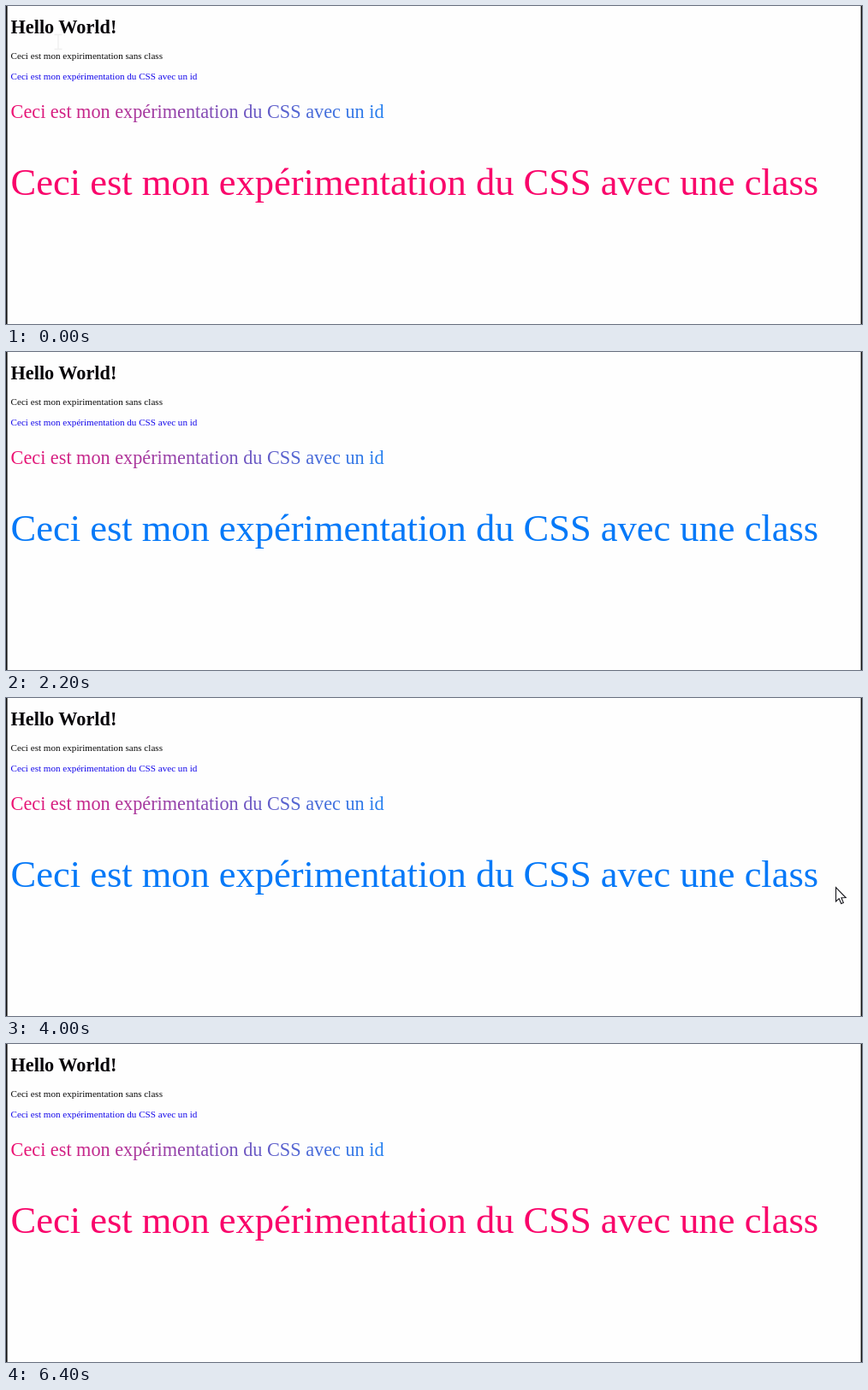
Write an HTML page with a canvas that moves like this. It is 1000 by 372 pixels and loops after 6500 ms.

```html
<!DOCTYPE html>
<html lang="fr">
<head>
<meta charset="utf-8">
<title>Hello World!</title>
<style>
  html, body { margin: 0; width: 100%; height: 100%; overflow: hidden; background: #fefefe; }
  canvas { display: block; }
</style>
</head>
<body>
<canvas id="stage" width="1000" height="372"></canvas>
<script>
const ctx = document.getElementById("stage").getContext("2d");
const LOOP = 6500, STEP = 100;
const EM = 11.12, LEFT = EM / 2, TOP = 11.9;
const LINE = 1.14, ASCENT = 0.911;
const PINK = "#f9046a", BLUE = "#0579f8";
const INTRO = "Ceci est mon expérimentation du CSS avec ";
const ARROW = new Path2D("M0 0V16.5L3.7 13.2 6.2 19 8.8 17.9 6.4 12.2 11.6 12Z");
const BEAM = new Path2D("M-4.5 -8.5h9m-4.5 0v17m-4.5 0h9");

const fade = ctx.createLinearGradient(LEFT, 0, 442, 0);
fade.addColorStop(0, "#ee1272");
fade.addColorStop(1, "#2480f0");

// Eased move between two points, k from 0 to 1
function glide(k, x0, y0, x1, y1) {
  const e = k * k * (3 - 2 * k);
  return [x0 + (x1 - x0) * e, y0 + (y1 - y0) * e];
}

function pointerAt(t) {
  if (t < 1400) return glide(t / 1400, 61, 42, 377.5, 240);
  if (t < 3300) return glide((t - 1400) / 1900, 377.5, 240, 514.5, 237);
  if (t < 4000) return glide((t - 3300) / 700, 514.5, 237, 969.5, 221.5);
  return glide((t - 4000) / 1000, 969.5, 221.5, 727.5, 170);
}

// Page flow: each block sits below the last, with collapsed margins
function drawPage(hover) {
  const blocks = [
    { text: "Hello World!", em: 2, margin: 1.34, color: "#060408", weight: "bold" },
    { text: "Ceci est mon expirimentation sans class", em: 1, color: "#080808" },
    { text: INTRO + "un id", em: 1, color: "#1206ea" },
    { text: INTRO + "un id", em: 2, color: fade },
    { text: INTRO + "une class", em: 4, color: hover ? BLUE : PINK }
  ];
  let y = TOP, gap = 0;
  for (const { text, em, margin = em, color, weight = "normal" } of blocks) {
    if (y > TOP) y += Math.max(gap, margin) * EM;
    ctx.font = `${weight} ${em * EM}px "Liberation Serif", "Times New Roman", serif`;
    ctx.fillStyle = color;
    ctx.fillText(text, LEFT, y + em * ASCENT * EM);
    y += em * LINE * EM;
    gap = margin;
  }
}

function drawPointer(t) {
  ctx.save();
  ctx.translate(...pointerAt(t));
  if (t < 1800) {
    ctx.strokeStyle = "#efefef";
    ctx.lineWidth = 1.3;
    ctx.stroke(BEAM);
  } else if (t >= 2900 && t < 5500) {
    ctx.fillStyle = "#fff";
    ctx.strokeStyle = "#16161c";
    ctx.lineWidth = 1.1;
    ctx.fill(ARROW);
    ctx.stroke(ARROW);
  }
  ctx.restore();
}

function draw(t) {
  ctx.fillStyle = "#111";
  ctx.fillRect(0, 0, 1000, 372);
  ctx.fillStyle = "#fefefe";
  ctx.fillRect(1.6, 0, 997, 372);
  drawPage(t >= 900 && t < 4800);
  drawPointer(Math.min(t, 5000) === t ? t : Math.max(t, 5000) < 5500 ? 5000 : t);
}

function tick() {
  const t = performance.now() % LOOP;
  draw(Math.floor(t / STEP) * STEP);
  requestAnimationFrame(tick);
}
ctx.fontKerning = "normal";
tick();
</script>
</body>
</html>
```
